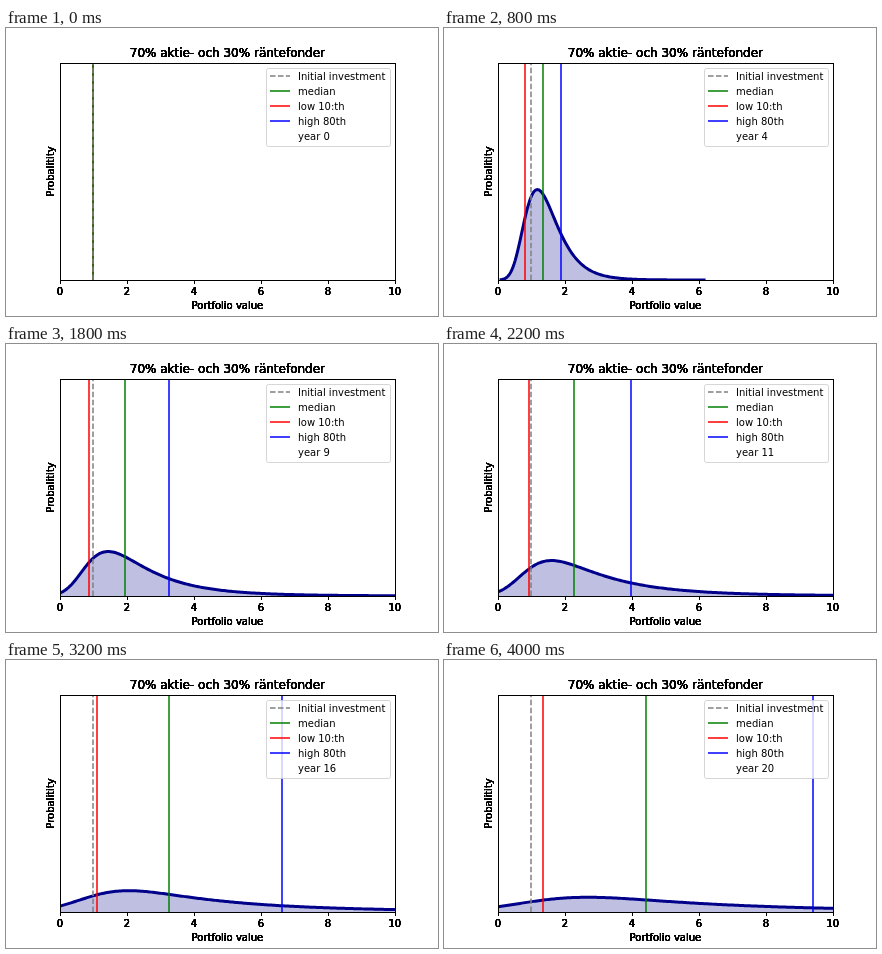
An HTML page with a canvas that plays this animation: 432x288 px, repeating every 4.2 s.

```html
<!DOCTYPE html>
<html lang="sv">
<head>
<meta charset="utf-8">
<title>Portfolio value</title>
<style>
html, body { margin: 0; width: 100%; height: 100%; overflow: hidden; background: #fff; }
canvas { display: block; }
</style>
</head>
<body>
<canvas id="chart" width="432" height="288"></canvas>
<script>
const ctx = document.getElementById('chart').getContext('2d');
const STEP = 200, YEARS = 21;
const LEFT = 54, RIGHT = 388.8, TOP = 34.56, BOTTOM = 252;
const UNIT = (RIGHT - LEFT) / 10;
const DENSITY = (BOTTOM - TOP) / 1.8;
const DASH = [5.55, 2.4];
const COLORS = { start: '#808080', mid: '#008000', low: '#ff0000', high: '#0000ff' };

// Log-interpolated between these years.
const KEYS = {
  year:  [0, 1, 2, 4, 6, 9, 13, 16, 20],
  low:   [1, 0.83, 0.81, 0.8, 0.81, 0.87, 0.985, 1.1, 1.34],
  mid:   [1, 1.075, 1.16, 1.35, 1.58, 1.94, 2.66, 3.25, 4.42],
  high:  [1, 1.277, 1.49, 1.89, 2.36, 3.26, 4.84, 6.63, 9.41],
  blur:  [0.03, 0.06, 0.09, 0.16, 0.24, 0.35, 0.58, 0.83, 1.27],
  end:   [1, 2.6, 4, 6.2, 9.1, 14, 20, 25, 30]
};

function valueAt(name, year) {
  const ys = KEYS.year, v = KEYS[name];
  let i = 0;
  while (i < ys.length - 2 && year > ys[i + 1]) i++;
  const k = (year - ys[i]) / (ys[i + 1] - ys[i]);
  return v[i] * Math.pow(v[i + 1] / v[i], k);
}

const px = v => LEFT + v * UNIT;

// Lognormal spread smoothed by a Gaussian kernel.
function densityCurve(year) {
  const mid = valueAt('mid', year), blur = valueAt('blur', year);
  const sigma = Math.log(valueAt('high', year) / valueAt('low', year)) / 2.1232;
  const parts = [];
  for (let z = -4; z <= 4; z += 0.05) {
    parts.push([mid * Math.exp(sigma * z), Math.exp(-z * z / 2)]);
  }
  const total = parts.reduce((sum, p) => sum + p[1], 0);
  const from = Math.max(0, 0.45 - 0.1 * year);
  const to = Math.min(10.1, valueAt('end', year));
  const points = [];
  for (let i = 0; i <= 200; i++) {
    const x = from + (to - from) * i / 200;
    let sum = 0;
    for (const [q, w] of parts) {
      const d = (x - q) / blur;
      sum += w * Math.exp(-d * d / 2);
    }
    const f = sum / total / (blur * Math.sqrt(2 * Math.PI));
    points.push([px(x), BOTTOM - f * DENSITY]);
  }
  return points;
}

function line(x1, y1, x2, y2, color, width, dash = []) {
  ctx.strokeStyle = color;
  ctx.lineWidth = width;
  ctx.setLineDash(dash);
  ctx.beginPath();
  ctx.moveTo(x1, y1);
  ctx.lineTo(x2, y2);
  ctx.stroke();
  ctx.setLineDash([]);
}

function text(str, x, y, { size = 10, align = 'center', passes = 1 } = {}) {
  ctx.font = `${size}px "DejaVu Sans", sans-serif`;
  ctx.textAlign = align;
  ctx.fillStyle = '#000';
  for (let i = 0; i < passes; i++) ctx.fillText(str, x, y);
}

function drawCurve(year) {
  const points = densityCurve(year);
  const trace = () => {
    ctx.beginPath();
    points.forEach(p => ctx.lineTo(p[0], p[1]));
  };
  trace();
  ctx.lineTo(points[points.length - 1][0], BOTTOM);
  ctx.lineTo(points[0][0], BOTTOM);
  ctx.fillStyle = 'rgba(0, 0, 139, 0.25)';
  ctx.fill();
  trace();
  ctx.strokeStyle = '#00008b';
  ctx.lineWidth = 3;
  ctx.lineJoin = 'round';
  ctx.stroke();
}

function drawMarker(value, color, dash) {
  const x = Math.round(px(value));
  line(x, BOTTOM, x, TOP, color, 1.5, dash);
}

function drawAxes() {
  ctx.strokeStyle = '#000';
  ctx.lineWidth = 1;
  ctx.strokeRect(54.5, 35.5, 335, 217);
  const bold = { passes: 8 };
  for (let v = 0; v <= 10; v += 2) {
    const x = Math.round(px(v)) + 0.5;
    line(x, 252, x, 256, '#000', 1);
    text(String(v), px(v), 267, bold);
  }
  text('70% aktie- och 30% räntefonder', 221.4, 29, { size: 12, passes: 8 });
  text('Portfolio value', 221.4, 281, bold);
  ctx.save();
  ctx.translate(48, 143.5);
  ctx.rotate(-Math.PI / 2);
  text('Probalitity', 0, 0, bold);
  ctx.restore();
}

function drawLegend(year) {
  ctx.beginPath();
  ctx.roundRect(260.5, 40.5, 124, 78, 2);
  ctx.fillStyle = 'rgba(255, 255, 255, 0.8)';
  ctx.fill();
  ctx.strokeStyle = 'rgba(204, 204, 204, 0.8)';
  ctx.lineWidth = 1;
  ctx.stroke();
  const rows = [
    ['Initial investment', COLORS.start, DASH],
    ['median', COLORS.mid],
    ['low 10:th', COLORS.low],
    ['high 80th', COLORS.high],
    ['year ' + year]
  ];
  rows.forEach(([label, color, dash], i) => {
    const y = 48 + 15 * i;
    if (color) line(264, y, 284, y, color, 1.5, dash);
    text(label, 292, y + 4, { align: 'left' });
  });
}

function draw(year) {
  ctx.fillStyle = '#fff';
  ctx.fillRect(0, 0, 432, 288);
  ctx.save();
  ctx.beginPath();
  ctx.rect(54, 35, 335, 217);
  ctx.clip();
  if (year > 0) drawCurve(year);
  for (const name of ['high', 'low', 'mid']) drawMarker(valueAt(name, year), COLORS[name]);
  drawMarker(1, COLORS.start, DASH);
  ctx.restore();
  drawAxes();
  drawLegend(year);
}

let shown = -1;
function tick() {
  const year = Math.floor(performance.now() / STEP) % YEARS;
  if (year !== shown) draw(shown = year);
  requestAnimationFrame(tick);
}
tick();
</script>
</body>
</html>
```
